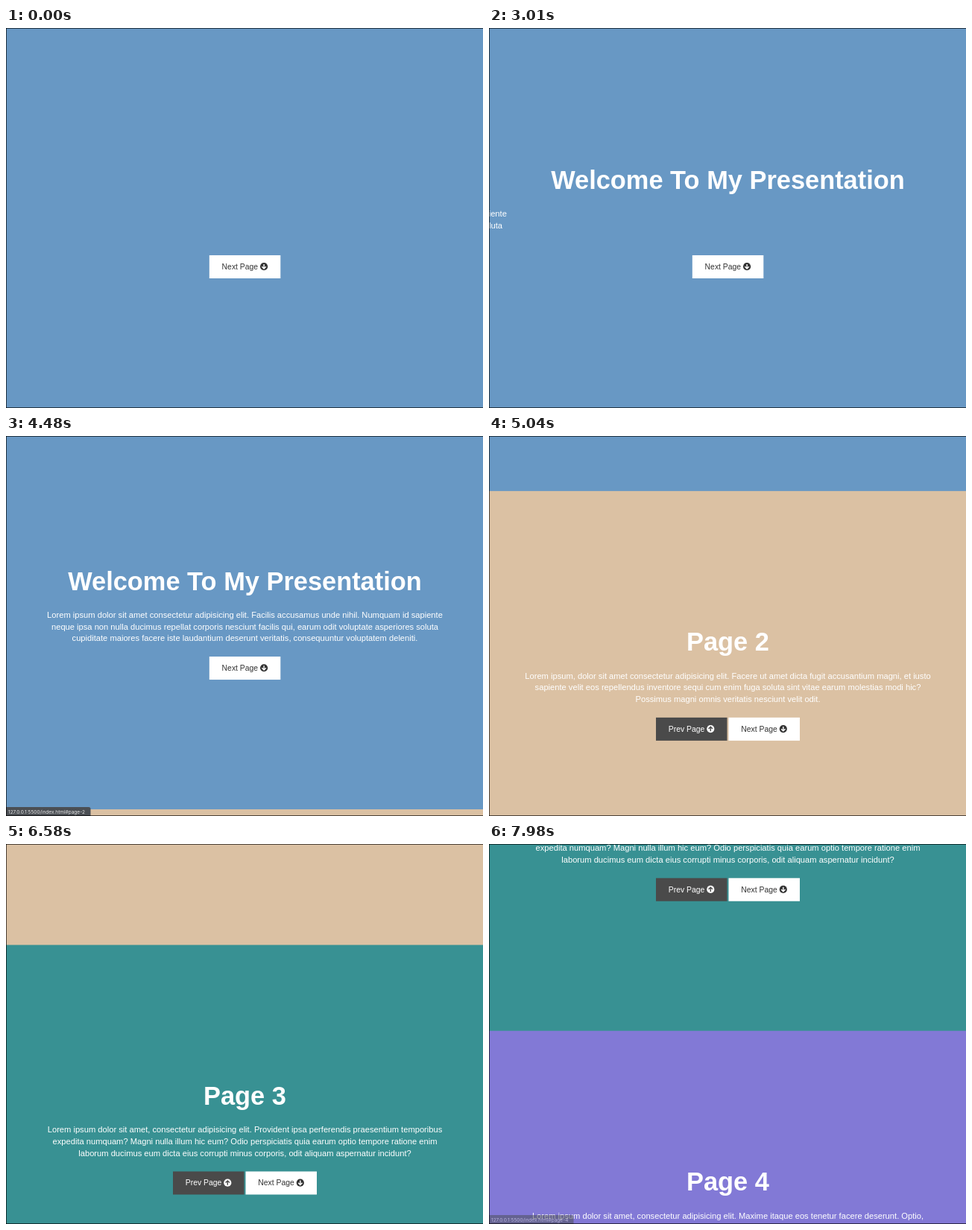
Recreate the animation shown at these times as an HTML page. Size 640 by 510 pixels, loop 8 s.

```html
<!DOCTYPE html>
<html lang="en">
<head>
<meta charset="utf-8">
<title>Presentation</title>
<style>
  html, body { margin: 0; width: 100%; height: 100%; overflow: hidden; background: #6898c4; }
  svg { display: block; width: 640px; height: 510px; font-family: "Liberation Sans", Arial, sans-serif; }
  .title { font-size: 34.4px; font-weight: bold; fill: #fff; text-anchor: middle; }
  .copy { font-size: 11.16px; fill: #fff; text-anchor: middle; }
  .label { font-size: 10.4px; }
  #status text { font: 6.5px Inter, Roboto, sans-serif; fill: #e6e6e6; }
</style>
</head>
<body>
<svg viewBox="0 0 640 510">
  <g id="deck"></g>
  <g id="status">
    <path d="M0 498H111Q113.500 498 113.500 500.500V510H0Z" fill="#4b4f54"/>
    <text x="3" y="506.500">127.0.0.1:5500/index.html#page-<tspan id="target">2</tspan></text>
  </g>
  <path d="M0 .5H640M.5 0V510M0 509.500H640" stroke="#000" stroke-opacity=".65"/>
</svg>
<script>
const LOOP = 8000, STEP = 70, PAGE_HEIGHT = 509, PAGE_WIDTH = 640;

const pages = [
  { color: '#6898c4', title: 'Welcome To My Presentation', lines: [
    'Lorem ipsum dolor sit amet consectetur adipisicing elit. Facilis accusamus unde nihil. Numquam id sapiente',
    'neque ipsa non nulla ducimus repellat corporis nesciunt facilis qui, earum odit voluptate asperiores soluta',
    'cupiditate maiores facere iste laudantium deserunt veritatis, consequuntur voluptatem deleniti.'] },
  { color: '#dbc1a3', title: 'Page 2', lines: [
    'Lorem ipsum, dolor sit amet consectetur adipisicing elit. Facere ut amet dicta fugit accusantium magni, et iusto',
    'sapiente velit eos repellendus inventore sequi cum enim fuga soluta sint vitae earum molestias modi hic?',
    'Possimus magni omnis veritatis nesciunt velit odit.'] },
  { color: '#389193', title: 'Page 3', lines: [
    'Lorem ipsum dolor sit amet, consectetur adipisicing elit. Provident ipsa perferendis praesentium temporibus',
    'expedita numquam? Magni nulla illum hic eum? Odio perspiciatis quia earum optio tempore ratione enim',
    'laborum ducimus eum dicta eius corrupti minus corporis, odit aliquam aspernatur incidunt?'] },
  { color: '#8279d6', title: 'Page 4', lines: [
    'Lorem ipsum dolor sit amet, consectetur adipisicing elit. Maxime itaque eos tenetur facere deserunt. Optio,'] }
];

const button = (x, label, back, ink, turn) => `
  <g transform="translate(${x} 304)" fill="${ink}">
    <rect width="95.5" height="31" fill="${back}"/>
    <text class="label" x="16.800" y="19">${label}</text>
    <g transform="translate(73.300 15.200) rotate(${turn})">
      <circle r="5.100"/>
      <path d="M0 -3.100V2.600M-2.700 .1L0 2.800L2.700 .1" fill="none" stroke="${back}" stroke-width="1.400"/>
    </g>
  </g>`;
const nextButton = x => button(x, 'Next Page', '#fff', '#333', 0);
const prevButton = x => button(x, 'Prev Page', '#4a4a4a', '#fff', 180);

const pageMarkup = ({ color, title, lines }, i) => `
  <g transform="translate(0 ${1 + i * PAGE_HEIGHT})">
    <rect width="640" height="510" fill="${color}"/>
    <text class="title" x="320.500" y="214.500">${title}</text>
    <g class="copy">${lines.map((line, n) =>
      `<text x="320.500" y="${252 + n * 15.62}">${line}</text>`).join('')}</g>
    ${i ? prevButton(224) + nextButton(321.5) : nextButton(272.8)}
  </g>`;

const deck = document.getElementById('deck');
deck.innerHTML = pages.map(pageMarkup).join('');
const heading = deck.querySelector('.title');
const copy = deck.querySelector('.copy');
const status = document.getElementById('status');
const target = document.getElementById('target');

const ramp = (t, start, length) => Math.min(1, Math.max(0, (t - start) / length));
const swing = p => 0.5 - Math.cos(Math.PI * p) / 2;

// CSS ease-in-out, solved for the curve parameter by bisection
function easeInOut(p) {
  let low = 0, high = 1, s;
  for (let i = 0; i < 24; i++) {
    s = (low + high) / 2;
    const r = 1 - s;
    const x = 3 * r * r * s * 0.42 + 3 * r * s * s * 0.58 + s ** 3;
    if (x < p) low = s; else high = s;
  }
  return s * s * (3 - 2 * s);
}

const scrollStarts = [4409, 6030, 7556];
const hovers = [
  { from: 735, to: 2640, page: 2 },
  { from: 4150, to: 4740, page: 2 },
  { from: 5270, to: 6360, page: 3 },
  { from: 6900, to: 7886, page: 4 }
];

const move = (node, x, y) => node.setAttribute('transform', `translate(${x.toFixed(2)} ${y.toFixed(2)})`);

function render(t) {
  move(heading, 0, -PAGE_HEIGHT * (1 - easeInOut(ramp(t, 894, 1000))));
  move(copy, -PAGE_WIDTH * (1 - easeInOut(ramp(t, 2767, 1000))), 0);
  const scrolled = scrollStarts.reduce((sum, start) => sum + swing(ramp(t, start, 838)), 0);
  move(deck, 0, -PAGE_HEIGHT * scrolled);

  const hover = hovers.filter(h => t >= h.from).pop();
  status.setAttribute('opacity', hover ? ramp(t, hover.from, 100) * (1 - ramp(t, hover.to, 200)) : 0);
  if (hover) target.textContent = hover.page;
}

const begin = performance.now();
function tick() {
  const t = (performance.now() - begin) % LOOP;
  render(Math.floor(t / STEP) * STEP);
  requestAnimationFrame(tick);
}
tick();
</script>
</body>
</html>
```
